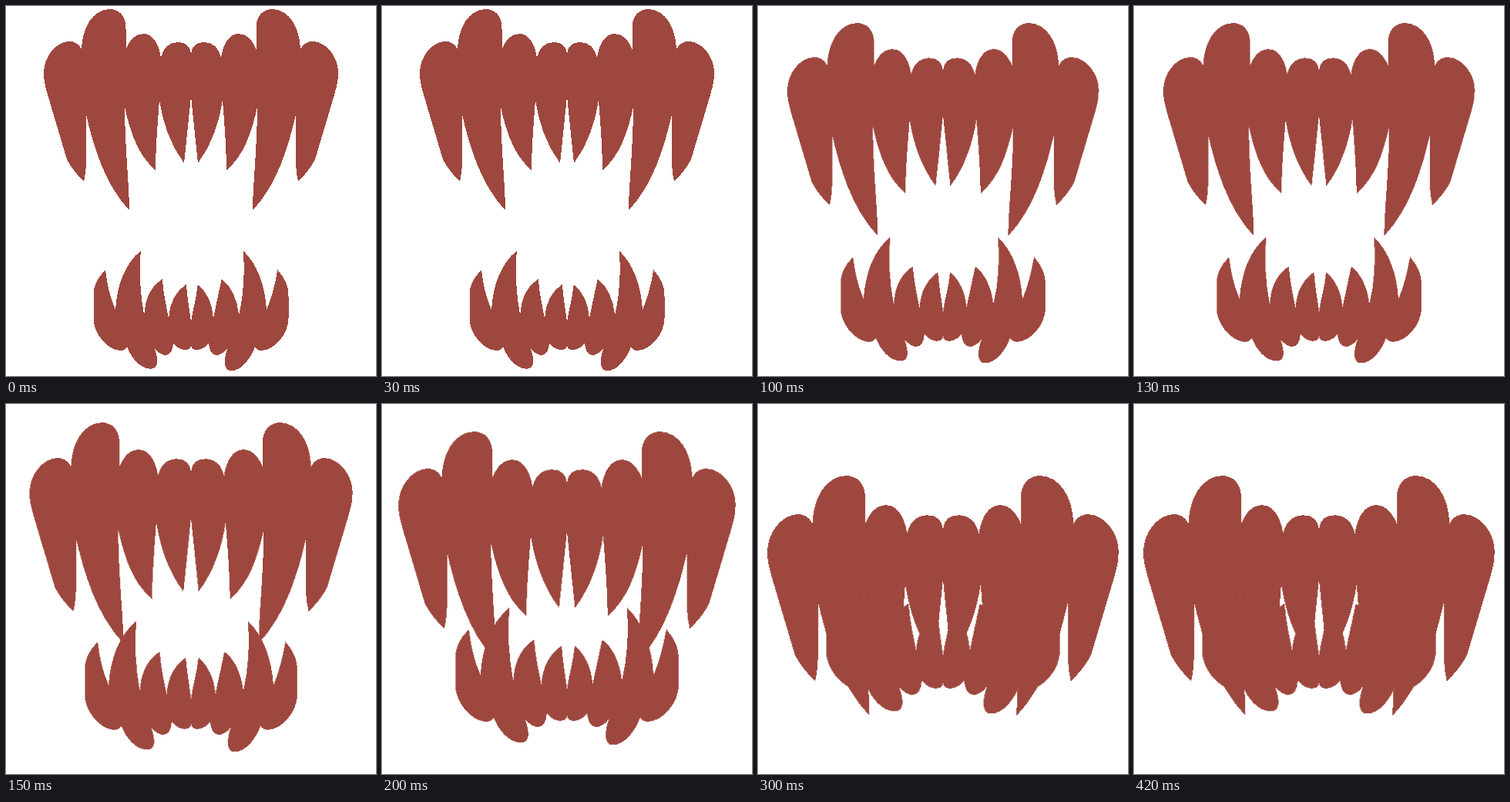
An HTML page for the animation above (500 ms loop, 480 by 480 pixels).

```html
<!DOCTYPE html>
<html lang="en">
<head>
<meta charset="utf-8">
<title>Biting jaws</title>
<style>
  html, body { margin: 0; width: 100%; height: 100%; overflow: hidden; background: #fff; }
  svg { display: block; width: 100%; height: 100%; }
  path { fill: #9e473e; shape-rendering: crispEdges; }
</style>
</head>
<body>
<svg viewBox="0 0 480 480">
  <g id="lower"></g>
  <g id="upper"></g>
</svg>
<script>
const MID = 240;
const LOOP = 500;
const STEP = 50;

// Left half of the upper jaw: gum lobes outwards, then teeth back to the middle.
const upperHalf = () => `M240 62
  C239 52 233 47 223 47 C211 47 203.5 55 201 67
  C198 48 190 36 178 36 C167 36 160 45 155.5 56
  L155.5 30 C156 13 147 4 134 4 C113 5 99 27 98 56
  C94 48 88 46 82 46 C65 46 49 66 49 86
  C49 98 51 104 54 115 L79 199
  C84 209 92 219 101 227.5
  C104 214 104 205 104 198 L104 141
  C113 180 128 232 160 265
  C160 235 154 180 154 131
  C161.5 165 171.5 194 194 213
  C194 190 196 160 199 122
  C203 150 213 180 231 204
  C233.5 180 237 147 240 117
  L242 110 V70 Z`;

// Left half of the lower jaw; lean shifts the tooth tips sideways.
const lowerHalf = lean => `M240 410
  C238 395 ${234 + lean} 378 ${232.5 + lean} 361
  C220 370 212 386 211 405
  C208 390 204 372 ${201.5 + lean} 354
  C188 363 180 380 ${178.5 + lean / 2} 401
  C${173 + lean} 375 ${171 + lean} 345 ${173.5 + lean} 317.5
  C154 335 144 362 142 394
  C135 378 131 361 ${128.3 + lean / 2} 342
  C118 354 113.5 362 113.5 377
  V405 C113.5 425 131 446 148 447
  C153 447 156 445 157 442
  C163 458 175 ${472 - lean} 188 ${472 - lean}
  C198 ${472 - lean} 198 459 192.5 444
  C197 450 203 453 207 453 C213 453 217 446 217 437
  C221 443 227 446 232 446 C237 446 240 444 240 440
  L242 436 V414 Z`;

// Each pose: scale, y of the anchored edge.
const jaws = {
  upper: {
    anchor: 4, half: upperHalf,
    poses: [[1, 4], [1.029, 6], [1.058, 22], [1.097, 24], [1.145, 35.7], [1.172, 57], [1.193, 93]]
  },
  lower: {
    anchor: 473, half: lowerHalf,
    poses: [[1, 473], [1.02, 472], [1.051, 463], [1.09, 451], [1.146, 442], [1.17, 424.5], [1.2, 401.5]]
  }
};

const place = (scale, y, anchor) =>
  `translate(${MID * (1 - scale)}px, ${y - anchor * scale}px) scale(${scale})`;

for (const [id, { anchor, half, poses }] of Object.entries(jaws)) {
  const jaw = document.getElementById(id);
  jaw.innerHTML = `<path d="${half(1.3)}"/>
    <path d="${half(-1.3)}" transform="matrix(-1 0 0 1 ${2 * MID} 0)"/>`;

  const frames = poses.map(([scale, y], i) => ({
    offset: i * STEP / LOOP,
    transform: place(scale, y, anchor),
    easing: 'step-end'
  }));
  frames.push({ ...frames[frames.length - 1], offset: 1 });
  jaw.animate(frames, { duration: LOOP, iterations: Infinity });
}
</script>
</body>
</html>
```
